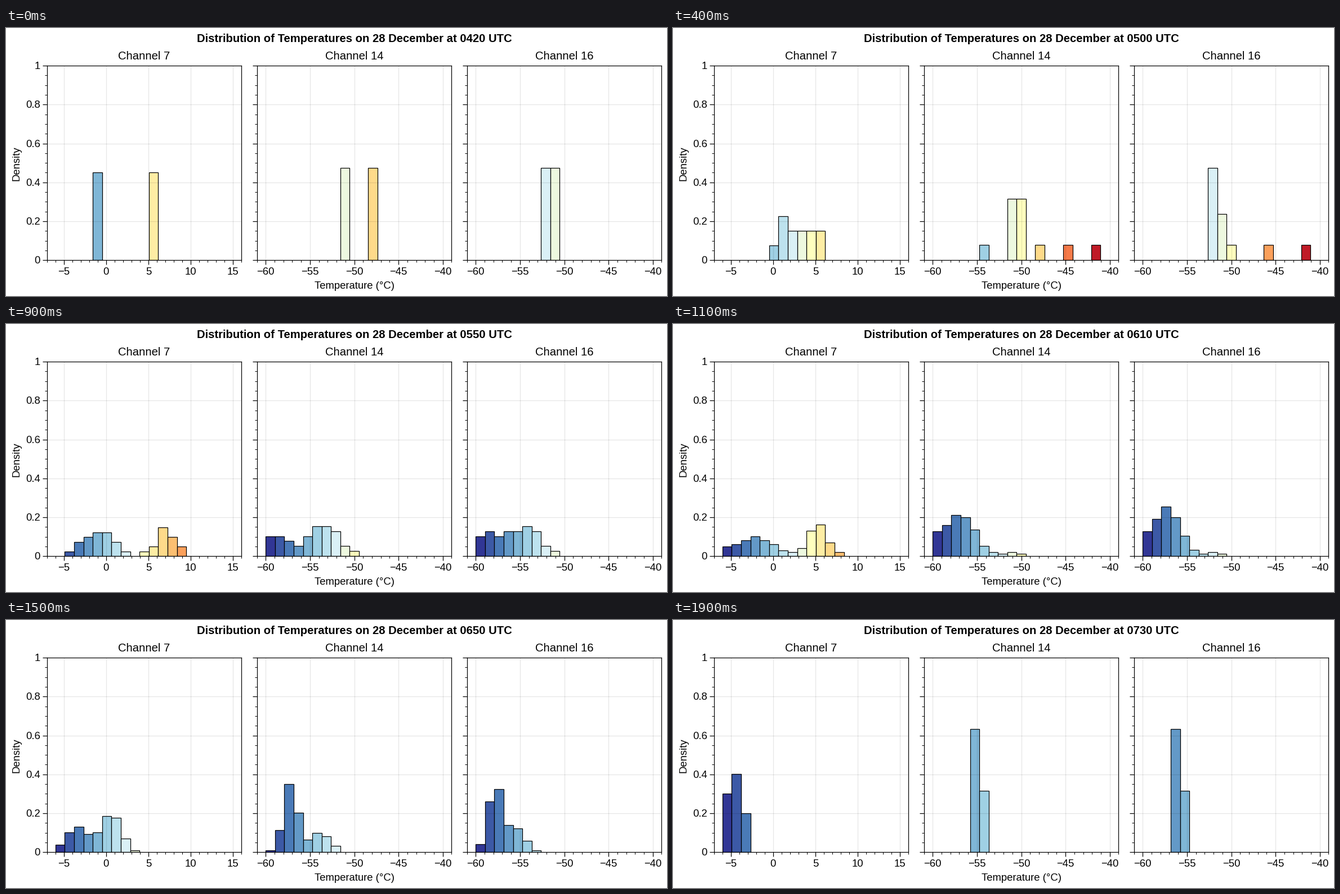
Write a matplotlib script that moves like this. It is 1174 by 477 pixels and loops after 2000 ms.

```python
import math

import matplotlib.pyplot as plt
import numpy as np
from matplotlib.animation import FuncAnimation
from matplotlib.ticker import MultipleLocator

W, H, DPI = 1174, 477, 128
PT = 72 / DPI                     # points per pixel
FRAMES, STEP_MS = 20, 100
BINS = 19
LINE = 1.23 * PT
SMALL, LARGE = 18.5 * PT, 20.25 * PT
TOP, BOTTOM = 67.1, 413.1
LEFT, SIDE, PITCH = 72.62, 345.8, 373

plt.rcParams["font.family"] = "Liberation Sans"

# Each panel holds a cold and a warm clump of samples. Key points give the
# clump centres (in bins) and the warm share; the rest follows from rules.
KEYS = [0, 2, 6, 9, 11, 15, 19]
TOTAL = [2, 17, 6, 37, 90, 117, 9]

PANELS = [
    dict(name="Channel 7", lo=-6, hi=15, calm=0.75, growth=1.25, scatter=0,
         cold=[4, 6, 6.6, 4.1, 3, 1.9, 0.9],
         warm=[10, 8.6, 9.5, 11.3, 9.7, 5.45, 5],
         share=[0.5, 0.5, 0.5, 0.4, 0.47, 0.58, 0]),
    dict(name="Channel 14", lo=-60, hi=-40, calm=0.35, growth=1.3, scatter=3.5,
         cold=[8, 8, 9, 1, 2.3, 2.15, 4.35],
         warm=[11, 12, 10.6, 5.8, 8, 5.3, 5],
         share=[0.5, 0.35, 0.5, 0.67, 0.04, 0.28, 0]),
    dict(name="Channel 16", lo=-60, hi=-40, calm=0.4, growth=1, scatter=3.5,
         cold=[7, 6.9, 7.9, 1.2, 2.05, 1.55, 3.3],
         warm=[8, 13.5, 12, 4.9, 7, 3.7, 4],
         share=[0.5, 0.35, 0.17, 0.62, 0.04, 0.33, 0]),
]


def bump(t, peak, width):
    return math.exp(-((t - peak) / width) ** 2)


def below(x, centre, spread):
    """Share of a normal clump that lies below x."""
    return 0.5 + 0.5 * math.erf((x - centre) / spread / math.sqrt(2))


def densities(panel, step):
    total, cold, warm, share = (
        np.interp(step, KEYS, track) for track in
        (TOTAL, panel["cold"], panel["warm"], panel["share"]))
    total = round(total)
    cold_spread = panel["calm"] + panel["growth"] * bump(step, 11, 3.5)
    warm_spread = 1 + panel["scatter"] * bump(step, 4, 3.5)

    cdf = [(1 - share) * below(i + 0.5, cold, cold_spread)
           + share * below(i + 0.5, warm, warm_spread)
           for i in range(BINS - 1)]
    # rounding the running total keeps whole samples in every bin
    counts = np.diff(np.round(total * np.array([0, *cdf, 1])))
    return counts / total * BINS / (panel["hi"] - panel["lo"])


def label(x, y, text, size, **kw):
    kw = {"ha": "center", "va": "baseline", **kw}
    return fig.text(x / W, 1 - y / H, text, fontsize=size, **kw)


def number(v):
    return f"{v:g}".replace("-", "\u2212")


def make_bars(panel, left):
    lo, hi = panel["lo"], panel["hi"]
    ax = fig.add_axes([left / W, 1 - BOTTOM / H, SIDE / W, (BOTTOM - TOP) / H])
    ax.set(xlim=(lo - 1, hi + 1), ylim=(0, 1))
    ax.xaxis.set_major_locator(MultipleLocator(5))
    ax.xaxis.set_minor_locator(MultipleLocator(1))
    ax.yaxis.set_major_locator(MultipleLocator(0.2))
    ax.yaxis.set_minor_locator(MultipleLocator(0.05))
    ax.tick_params(which="major", length=8 * PT, width=LINE,
                   labelbottom=False, labelleft=False)
    ax.tick_params(which="minor", length=4 * PT, width=0.8 * LINE)
    ax.set_axisbelow("line")
    ax.grid(True, color="black", alpha=0.1, linewidth=LINE)
    for spine in ax.spines.values():
        spine.set_linewidth(LINE)

    label(left + SIDE / 2, 56.5, panel["name"], LARGE)
    for v in range(-60, 16, 5):
        if lo - 1 < v < hi + 1:
            x = left + SIDE * (v - lo + 1) / (hi - lo + 2)
            label(x, 439, number(v), SMALL)

    edges = np.linspace(lo, hi, BINS + 1)
    colors = plt.get_cmap("RdYlBu_r")(np.linspace(0, 1, BINS))
    return ax.bar(edges[:-1], np.zeros(BINS), edges[1] - edges[0],
                  align="edge", color=colors, edgecolor="black",
                  linewidth=LINE)


fig = plt.figure(figsize=(W / DPI, H / DPI), dpi=DPI, facecolor="white")
title = label(618.5, 25, "", LARGE, weight="bold")
label(618.5, 464, "Temperature (\u00b0C)", SMALL)
label(28, 241, "Density", SMALL, rotation=90, ha="right", va="center")
for i in range(6):
    y = BOTTOM - i * (BOTTOM - TOP) / 5
    label(61, y + 6, number(i / 5), SMALL, ha="right")
bar_sets = [make_bars(p, LEFT + i * PITCH) for i, p in enumerate(PANELS)]


def draw(step):
    hour, minute = divmod(4 * 60 + 20 + 10 * step, 60)
    title.set_text("Distribution of Temperatures on 28 December at "
                   f"{hour:02d}{minute:02d} UTC")
    for panel, bars in zip(PANELS, bar_sets):
        for bar, h in zip(bars, densities(panel, step)):
            bar.set_height(h)
            bar.set_visible(h > 0)
    return [title]


anim = FuncAnimation(fig, draw, frames=FRAMES, init_func=lambda: draw(0),
                     interval=STEP_MS, repeat=True, repeat_delay=0)
plt.show()
```
